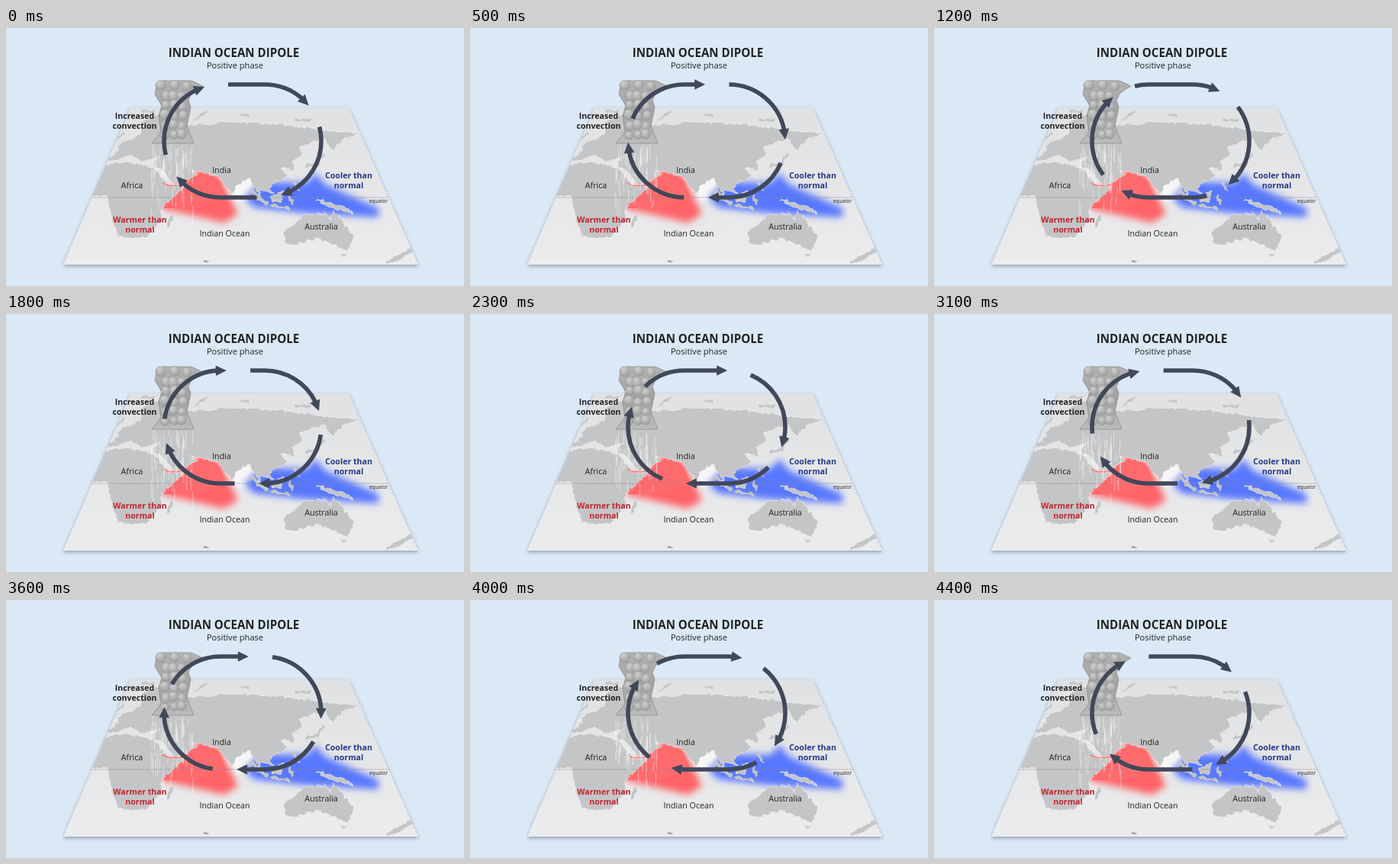
Write an HTML page that moves like this. It is 600x338 px and loops after 4.5 s.

```html
<!DOCTYPE html>
<html lang="en">
<head>
<meta charset="utf-8">
<title>Indian Ocean Dipole</title>
<style>
html, body { margin: 0; width: 100%; height: 100%; overflow: hidden; background: #dbe9f7; }
svg { display: block; width: 600px; height: 338px; }
text { font: 10.7px "Open Sans", "Noto Sans", sans-serif; text-anchor: middle; fill: #222; }
.bold { font-weight: 700; font-size: 10.6px; }
.warm { fill: #c4232f; }
.cool { fill: #29358c; }
</style>
</head>
<body>
<svg viewBox="0 0 600 338">
  <defs>
    <linearGradient id="sea" x2="0" y2="1"><stop stop-color="#dfe1e3"/><stop offset="1" stop-color="#ececed"/></linearGradient>
    <linearGradient id="vapour" x2="0" y2="1"><stop stop-color="#b4b4b4"/><stop offset=".5" stop-color="#a3a3a3"/><stop offset="1" stop-color="#bcbcbc"/></linearGradient>
    <radialGradient id="puff" cx=".4" cy=".3" r=".65"><stop stop-color="#cecece"/><stop offset="1" stop-color="#a2a2a2"/></radialGradient>
    <filter id="soft" x="-20%" y="-40%" width="140%" height="180%"><feGaussianBlur stdDeviation="5"/></filter>
    <filter id="shade" x="-5%" y="-5%" width="110%" height="110%"><feGaussianBlur stdDeviation="2.5"/></filter>
    <filter id="coast" color-interpolation-filters="sRGB" filterUnits="userSpaceOnUse" x="60" y="95" width="490" height="225">
      <feTurbulence type="fractalNoise" baseFrequency=".14" numOctaves="2" seed="4"/>
      <feDisplacementMap in="SourceGraphic" scale="7" xChannelSelector="R" yChannelSelector="G"/>
    </filter>
    <path id="sheet" d="M163 104H449L540 310H75Z"/>
    <clipPath id="edge"><use href="#sheet"/></clipPath>
  </defs>

  <use href="#sheet" y="2" fill="#52606e" opacity=".55" filter="url(#shade)"/>
  <use href="#sheet" fill="url(#sea)"/>
  <g clip-path="url(#edge)">
    <path d="M286 202L326 196 318 226 300 228Z" fill="#fff" opacity=".7" filter="url(#shade)"/>
    <path d="M200 220L258 184 279 194 304 244 285 255 203 236Z" fill="#ff6468" filter="url(#soft)"/>
    <path d="M200 236L240 193 262 189 279 199 289 222 250 236Z" fill="#ff6a6d"/>
    <path d="M312 222L335 201 394 203 405 190 418 205 488 236 488 248 395 243 325 235Z" fill="#5877ff" filter="url(#soft)"/>
    <g fill="#c4c5c6" stroke="#f3f3f3" stroke-width=".6" filter="url(#coast)">
      <!-- Eurasia -->
      <path d="M130 172L147 160 145 153 176 139 180 121 207 110 222 122 240 127 294 123 360 126 466 140 443 144 428 160 416 146 383 155 389 166 375 175 378 188 361 182 368 194 345 207 350 217 331 211 333 222 319 197 301 207 297 218 277 194 243 186 250 192 222 208 205 187 191 177 200 169 180 176 165 166 136 176Z"/>
      <!-- Africa -->
      <path d="M118 180L158 175 195 182 213 208 235 206 203 238 205 250 183 275 149 275 137 250 133 219 100 222Z"/>
      <!-- Australia -->
      <path d="M365 282L364 268 392 245 418 243 425 252 429 240 456 273 448 292 427 284 408 276 372 285ZM438 296H447L443 301Z"/>
      <!-- Borneo, New Guinea -->
      <path d="M347 221L364 213 360 228 349 228ZM407 225L443 234 454 243 422 234Z"/>
    </g>
    <!-- slender islands -->
    <g fill="none" stroke="#c4c5c6" stroke-linecap="round" filter="url(#coast)">
      <path d="M322 215L342 230M501 307L523 296 533 290" stroke-width="5"/>
      <path d="M348 233L370 236M372 221L375 229M377 201L384 212M394 182L409 177 414 166M212 258L218 246" stroke-width="3.5"/>
      <path d="M178 109H194M248 119L262 110M308 114H317M380 121H398M147 145L153 137" stroke-width="3"/>
    </g>
    <path d="M205 203L215 207 231 206" fill="none" stroke="#f8797b" stroke-width="1.6"/>
    <path d="M112 222H502" stroke="#8b8b8b" stroke-width=".7" stroke-dasharray="2.5 1.2"/>
  </g>

  <path id="rain" fill="none" stroke="#fff" stroke-width=".7" opacity=".6"/>

  <path d="M191 151L203 136 200 115 204 102 195 87 197 75 205 69 243 69 258 76 243 86 239 95 242 104 237 128 246 151Z" fill="url(#vapour)" stroke="#858585" stroke-width=".7" stroke-linejoin="round"/>
  <g id="puffs" fill="url(#puff)" stroke="#888" stroke-width=".35"></g>

  <g fill="#404859">
    <path id="track" d="M281 74H339A74 74 0 0 1 339 222H281A74 74 0 0 1 281 74Z" fill="none" stroke="#404859" stroke-width="5.6"/>
    <g id="heads"></g>
  </g>

  <text x="298.5" y="37.5" style="font-size:15.1px;font-weight:700">INDIAN OCEAN DIPOLE</text>
  <text x="300" y="53" style="font-size:11.1px">Positive phase</text>
  <text class="bold" x="168.5" y="119">Increased</text>
  <text class="bold" x="168.5" y="131.5">convection</text>
  <text class="bold warm" x="175.5" y="255">Warmer than</text>
  <text class="bold warm" x="175.5" y="268">normal</text>
  <text class="bold cool" x="449" y="197">Cooler than</text>
  <text class="bold cool" x="449" y="209.5">normal</text>
  <text x="282.5" y="190">India</text>
  <text x="165" y="210">Africa</text>
  <text x="286.5" y="273">Indian Ocean</text>
  <text x="413" y="263.5">Australia</text>
  <text x="488" y="229" style="font-size:6.5px">equator</text>
  <text x="262" y="307" style="font-size:4px">90e</text>
</svg>
<script>
const LOOP = 4500, STEP = 100, ARROWS = 4, ARROW_LENGTH = 114, HEAD = 14, START = 10;
const get = id => document.getElementById(id);
const track = get('track'), rain = get('rain');
const perimeter = track.getTotalLength(), spacing = perimeter / ARROWS;

let seed = 17;
const random = () => (seed = seed * 16807 % 2147483647) / 2147483647;

function add(parent, tag, attributes) {
  const node = document.createElementNS('http://www.w3.org/2000/svg', tag);
  for (const key in attributes) node.setAttribute(key, attributes[key]);
  return parent.appendChild(node);
}

// Rows of billows, widest at the top and foot of the column.
for (let row = 0; row < 6; row++) {
  const reach = row ? 11 : 16;
  for (let side = -1; side <= 1; side++) add(get('puffs'), 'circle', {
    cx: 220 + side * reach + random() * 3 - 1.5,
    cy: 76 + row * 12.8 + random() * 3 - 1.5,
    r: 5.5 + random() * 1.5
  });
}

const heads = Array.from({ length: ARROWS }, () =>
  add(get('heads'), 'path', { d: `M0 0L${-HEAD} -6.8V6.8Z` }));
const shaft = ARROW_LENGTH - HEAD + 1;
track.setAttribute('stroke-dasharray', `${shaft} ${spacing - shaft}`);

const drops = Array.from({ length: 75 }, () => ({
  x: 190 + random() * 55,
  length: 7 + random() * 17,
  phase: random(),
  falls: 4 + Math.floor(random() * 4),
  end: 185 + random() * 53
}));

const pointAt = s => track.getPointAtLength((s % perimeter + perimeter) % perimeter);

function draw(time) {
  const p = Math.floor(time % LOOP / STEP) * STEP / LOOP;
  const tail = START + p * 3 * spacing;
  track.setAttribute('stroke-dashoffset', -tail);
  heads.forEach((head, i) => {
    const s = tail + i * spacing + ARROW_LENGTH;
    const tip = pointAt(s), base = pointAt(s - HEAD);
    const angle = Math.atan2(tip.y - base.y, tip.x - base.x) * 180 / Math.PI;
    head.setAttribute('transform', `translate(${tip.x} ${tip.y}) rotate(${angle})`);
  });
  rain.setAttribute('d', drops.map(d => {
    const y = 151 + (p * d.falls + d.phase) % 1 * (d.end - 151);
    return `M${d.x} ${y}v${d.length}`;
  }).join(''));
}

const begin = performance.now();
function tick() {
  draw(performance.now() - begin);
  requestAnimationFrame(tick);
}
tick();
</script>
</body>
</html>
```
